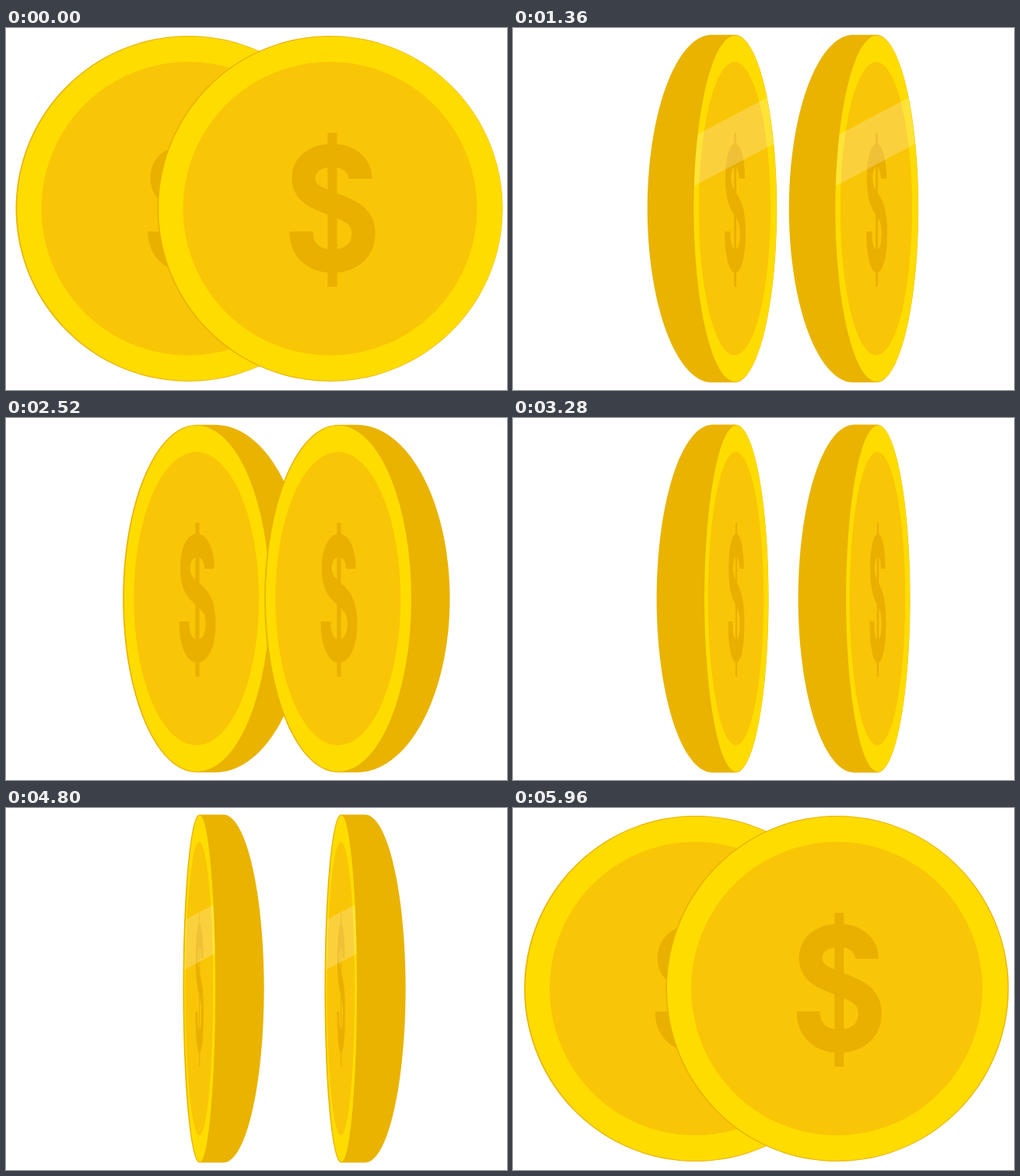
Recreate the animation shown at these times as an HTML page with a canvas. Size 644 by 466 pixels, loop 6.76 s.

```html
<!DOCTYPE html>
<html lang="en">
<head>
<meta charset="utf-8">
<title>Spinning coins</title>
<style>
html, body { margin: 0; width: 100%; height: 100%; overflow: hidden; background: #fff; }
canvas { display: block; }
</style>
</head>
<body>
<canvas id="stage" width="644" height="466"></canvas>
<script>
const ctx = document.getElementById('stage').getContext('2d');
const LOOP = 6760, STEP = 40, LAST_STEP = 5960;
const HALF_TURN = 1962, SHINE_PERIOD = 3422;
const RADIUS = 222, SHINE_X = 234.5, CENTER_Y = 232.5, COIN_GAP = 182;
const COLORS = { rim: '#ffdc00', face: '#f9c507', side: '#e9b300', sign: '#e9b000' };

// Half width and centre of the coin, and height of the shine, as [ms, px]
const TURN = [[0, 222], [156, 215], [680, 71], [760, 53], [876, 36.5], [1090, 0],
  [1318, -57], [1440, -91], [1516, -108], [1840, -206.5], [HALF_TURN, -222]];
const SWAY = [[0, 234.5], [156, 234.5], [760, 265], [876, 264], [1318, 271.5],
  [1516, 258], [1840, 236.5], [HALF_TURN, 234.5]];
const SHINE = [[0, -69], [760, 65], [1380, 174], [1840, 255], [2500, 525], [SHINE_PERIOD, 800]];

// Monotone cubic curve through a list of points
function makeCurve(points) {
  const slopes = points.slice(1).map(([x, y], i) => (y - points[i][1]) / (x - points[i][0]));
  const tangents = points.map((_, i) => {
    const before = slopes[i - 1], after = slopes[i];
    return before * after > 0 ? 2 * before * after / (before + after) : 0;
  });
  return x => {
    let i = 0;
    while (i < points.length - 2 && x > points[i + 1][0]) i++;
    const [x0, y0] = points[i], [x1, y1] = points[i + 1];
    const w = x1 - x0, s = (x - x0) / w, r = 1 - s;
    return y0 * (1 + 2 * s) * r * r + y1 * s * s * (3 - 2 * s)
      + w * s * r * (tangents[i] * r - tangents[i + 1] * s);
  };
}

const turnAt = makeCurve(TURN);
const swayAt = makeCurve(SWAY);
const shineAt = makeCurve(SHINE);

function disc(x, rx, ry, color) {
  ctx.beginPath();
  ctx.ellipse(x, CENTER_Y, Math.max(rx, 0), ry, 0, 0, Math.PI * 2);
  ctx.fillStyle = color;
  ctx.fill();
}

function drawBody(a, b, ry) {
  const steps = 90, left = [], right = [];
  for (let i = 0; i <= steps; i++) {
    const angle = Math.PI * i / steps, reach = Math.sin(angle);
    const y = CENTER_Y - ry * Math.cos(angle);
    const la = Math.abs(a.rx) * reach, lb = Math.abs(b.rx) * reach;
    left.push([Math.min(a.x - la, b.x - lb), y]);
    right.push([Math.max(a.x + la, b.x + lb), y]);
  }
  ctx.beginPath();
  for (const [x, y] of left.concat(right.reverse())) ctx.lineTo(x, y);
  ctx.closePath();
  ctx.fillStyle = COLORS.side;
  ctx.fill();
}

function drawSign(x, scale) {
  ctx.save();
  ctx.translate(x + 3 * scale, 234);
  ctx.scale(scale, 1);
  ctx.beginPath();
  ctx.moveTo(36, -40);
  ctx.bezierCurveTo(36, -58, 20, -70, 0, -70);
  ctx.bezierCurveTo(-22, -70, -37, -58, -37, -41);
  ctx.bezierCurveTo(-37, 0, 40, -15, 40, 30);
  ctx.bezierCurveTo(40, 54, 22, 66, 0, 66);
  ctx.bezierCurveTo(-24, 66, -40, 52, -40, 28);
  ctx.lineWidth = 30;
  ctx.strokeStyle = ctx.fillStyle = COLORS.sign;
  ctx.stroke();
  ctx.fillRect(-6, -99, 12, 198);
  ctx.restore();
}

function drawShine(x, rx, ry, y) {
  const slope = 0.53, half = 32, span = 260;
  ctx.save();
  ctx.beginPath();
  ctx.ellipse(x, CENTER_Y, rx, ry, 0, 0, Math.PI * 2);
  ctx.clip();
  ctx.translate(SHINE_X, y);
  ctx.beginPath();
  ctx.moveTo(-span, span * slope - half);
  ctx.lineTo(span, -span * slope - half);
  ctx.lineTo(span, -span * slope + half);
  ctx.lineTo(-span, span * slope + half);
  ctx.fillStyle = 'rgba(255,255,255,.21)';
  ctx.fill();
  ctx.restore();
}

function drawCoin(t) {
  const phase = t % HALF_TURN;
  const mid = turnAt(phase), x = swayAt(phase);
  const edge = 1 - (mid / RADIUS) ** 2;
  const depth = 32 * edge;
  const ry = 222.5 + 1.5 * edge;
  const front = { x: x - depth / 2, rx: mid - depth / 2 };
  const back = { x: x + depth / 2, rx: mid + depth / 2 };
  drawBody(front, back, ry);

  const visible = front.rx > 0 ? front : back.rx < 0 ? back : null;
  if (!visible) return;
  const rx = Math.abs(visible.rx), rimX = visible.x + 0.7, rimRx = Math.max(rx - 1, 0);
  disc(rimX, rimRx, ry - 1, COLORS.rim);
  disc(visible.x, rx * 0.851, 189, COLORS.face);
  drawSign(visible.x, rx / RADIUS);
  drawShine(rimX, rimRx, ry - 1, shineAt(t % SHINE_PERIOD));
}

function draw(now) {
  const t = Math.min(Math.floor((now % LOOP) / STEP) * STEP, LAST_STEP);
  ctx.fillStyle = '#fff';
  ctx.fillRect(0, 0, 644, 466);
  for (const offset of [0, COIN_GAP]) {
    ctx.save();
    ctx.translate(offset, 0);
    drawCoin(t);
    ctx.restore();
  }
}

const start = performance.now();
function tick() {
  draw(performance.now() - start);
  requestAnimationFrame(tick);
}
tick();
</script>
</body>
</html>
```
